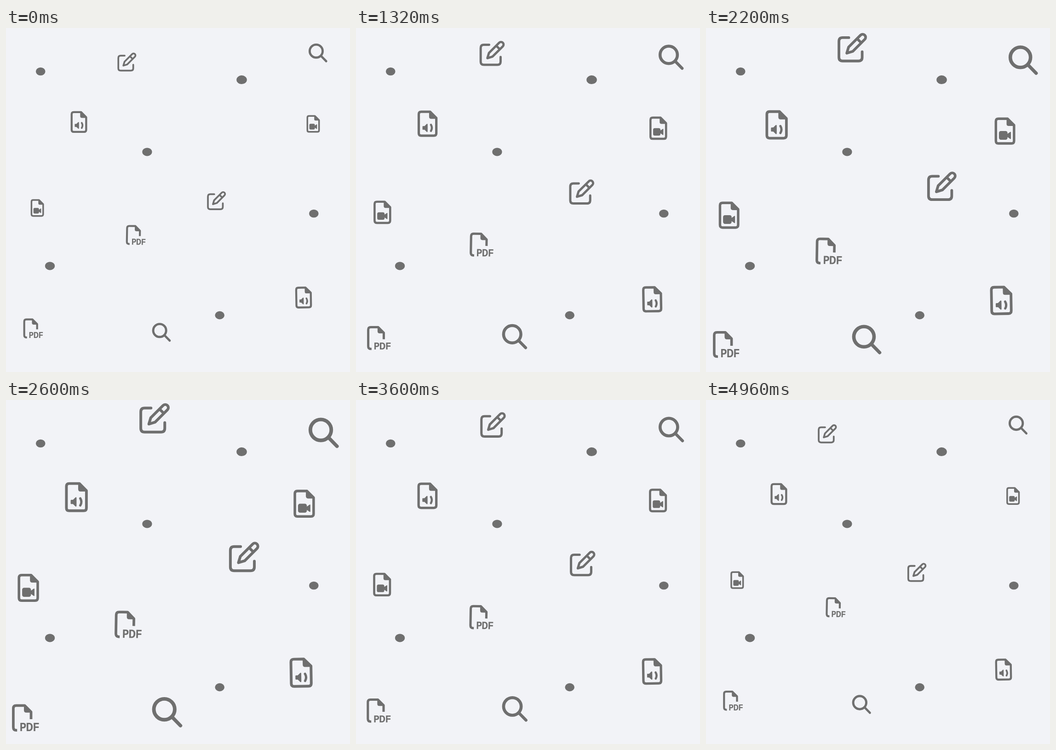
Write an HTML page that moves like this. It is 748 px wide and 748 px high and loops after 5000 ms.

```html
<!DOCTYPE html>
<html lang="en">
<head>
<meta charset="utf-8">
<title>Floating file icons</title>
<style>
  html, body { margin: 0; width: 100%; height: 100%; overflow: hidden; background: #f2f3f7; }
  svg { display: block; width: 100%; height: 100%; }
  .line { fill: none; stroke: #6f6f6f; stroke-width: 5.8; stroke-linecap: round; stroke-linejoin: round; }
  .solid { fill: #6f6f6f; }
  text { font: 700 24.5px "Noto Sans Mono", monospace; letter-spacing: -.5px; }
</style>
</head>
<body>
<svg id="stage" viewBox="0 0 748 748">
  <defs>
    <g id="search" class="line" stroke-width="7">
      <circle cx="25.7" cy="25.8" r="22" style="stroke-width:7.6"/>
      <path d="M42 42L59.8 60.2" style="stroke-width:7.4"/>
    </g>
    <g id="edit" class="line">
      <path d="M24.5 10.2H11Q3 10.2 3 18.2V53Q3 61 11 61H45.5Q53.5 61 53.5 53V41"/>
      <path d="M49.9 4.9A6.5 6.5 0 0 1 59.1 14.1L33.2 40L20 44L24 30.8ZM42.4 12.4L51.6 21.6"/>
    </g>
    <g id="page">
      <path class="line" d="M9 3H30.5L45.5 18V54.8Q45.5 60.8 39.5 60.8H9Q3 60.8 3 54.8V9Q3 3 9 3Z"/>
      <path class="solid" d="M28 2H31L46.5 18V20H33Q28 20 28 15Z"/>
    </g>
    <g id="audio">
      <use href="#page"/>
      <path class="solid" d="M13.5 37.5H17L22 32.6Q24.5 31 24.5 34V50Q24.5 53 22 51.4L17 46.5H13.5Q12 46.5 12 45V39Q12 37.5 13.5 37.5Z"/>
      <path class="line" d="M32.5 34.5Q37 42 32.5 49.5" style="stroke-width:5"/>
    </g>
    <g id="video">
      <use href="#page"/>
      <rect class="solid" x="10.2" y="31.7" width="20" height="20.5" rx="4.5"/>
      <path class="solid" d="M29 39L36.5 33.8Q38.2 33 38.2 35V49Q38.2 51 36.5 50.2L29 45Z"/>
    </g>
    <g id="pdf">
      <path class="line" d="M11 55.6H9.5Q2.9 55.6 2.9 49V9Q2.9 2.9 9 2.9H27L40.6 16.5V32" style="stroke-linecap:butt;stroke-width:5.6"/>
      <path class="solid" d="M25.5 2H28L42.5 16V18H30.5Q25.5 18 25.5 13Z"/>
      <text class="solid" x="16" y="57.4">PDF</text>
    </g>
  </defs>
</svg>
<script>
const LOOP = 5000;
const stage = document.getElementById('stage');

function add(tag, attrs) {
  const node = document.createElementNS(stage.namespaceURI, tag);
  for (const name in attrs) node.setAttribute(name, attrs[name]);
  return stage.appendChild(node);
}

// cx, cy, rx, ry
[
  [75.2, 94.5, 10.3, 8.8], [512.5, 112.6, 11.3, 9.5], [306.9, 269.4, 10.7, 9],
  [669.3, 403.5, 10.3, 8.8], [95.5, 517.4, 10.7, 9], [464.7, 624.6, 10.3, 8.8]
].forEach(([cx, cy, rx, ry]) => add('ellipse', { cx, cy, rx, ry, class: 'solid' }));

// from and to: x, y, scale; twin: offset and tilt of the second copy
const icons = [
  { id: 'search', from: [658, 33.7, .64], to: [658, 38.6, 1.049], twin: [-340.3, 607.5, 0] },
  { id: 'edit', from: [242.3, 53.5, .642], to: [292, 4.9, 1.049], twin: [194.8, 301.4, 0] },
  { id: 'audio', from: [140.5, 180.6, .744], to: [127.8, 178.5, 1.035], twin: [488.5, 381.7, -1] },
  { id: 'video', from: [653.5, 189.4, .598], to: [624, 195.2, .975], twin: [-599.9, 182.9, 0] },
  { id: 'pdf', from: [37.5, 631.5, .743], to: [11.9, 662.6, 1.035], twin: [223.4, -203, 1] }
];
const movers = icons.flatMap(({ id, from, to, twin }) =>
  [[0, 0, 0], twin].map(shift => ({ node: add('use', { href: '#' + id }), from, to, shift })));

function draw() {
  const p = 1 - Math.abs(1 - (performance.now() % LOOP) / LOOP * 2);
  for (const { node, from, to, shift: [dx, dy, tilt] } of movers) {
    const [x, y, scale] = from.map((v, i) => v + (to[i] - v) * p);
    node.setAttribute('transform',
      `translate(${x + dx} ${y + dy}) scale(${scale}) rotate(${tilt} 25 30)`);
  }
  requestAnimationFrame(draw);
}
draw();
</script>
</body>
</html>
```
